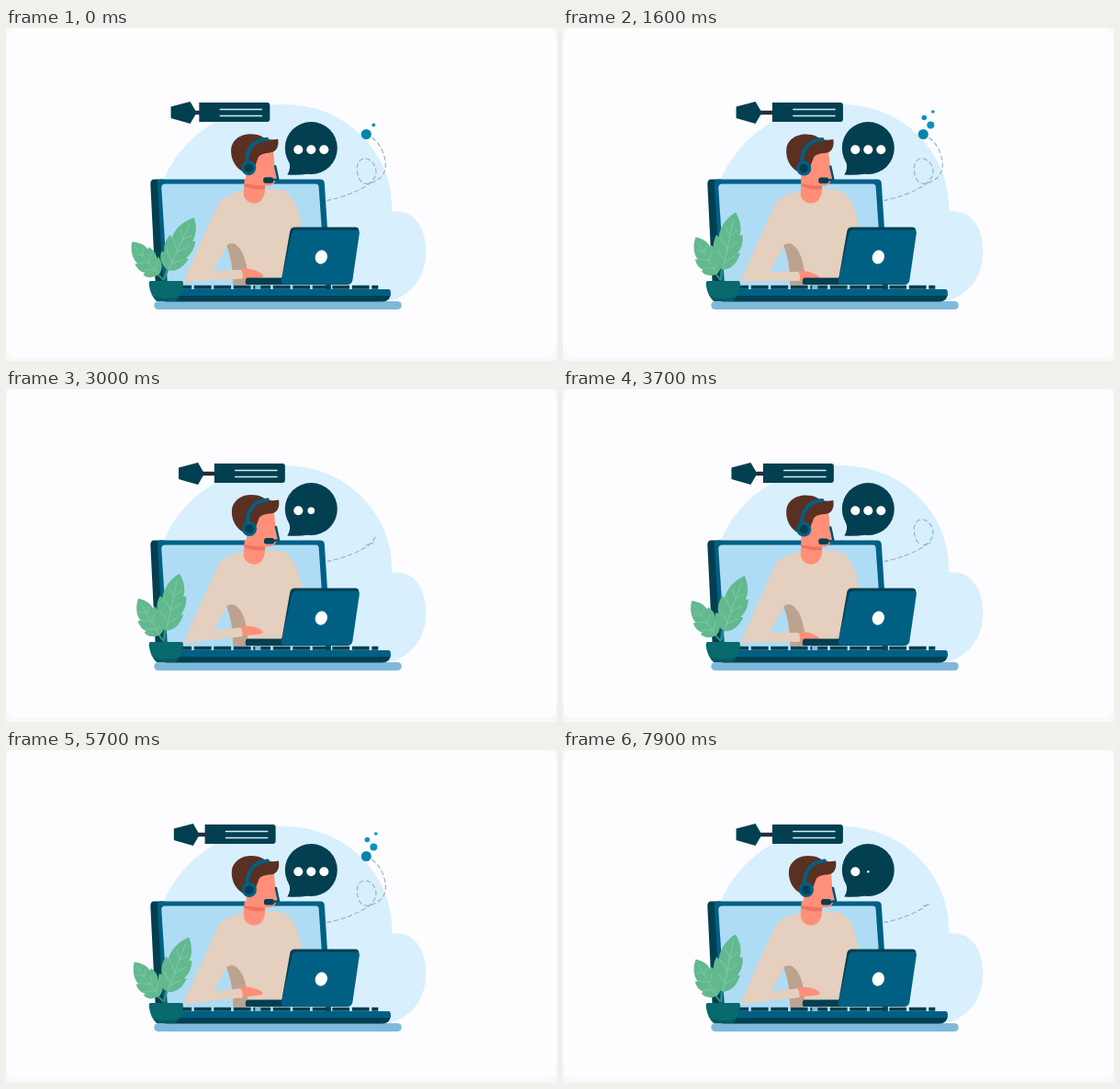
An HTML page that plays this animation: 600x362 px, repeating every 8 s.

```html
<!DOCTYPE html>
<html lang="en">
<head>
<meta charset="utf-8">
<title>Support agent</title>
<style>
html, body { margin: 0; width: 100%; height: 100%; overflow: hidden; background: #f8f8f9; }
svg { display: block; width: 600px; height: 362px; }
.dark { fill: #023f50; }
.blue { fill: #006084; }
.skin { fill: #ff8f78; }
.shirt { fill: #e5cfbe; }
.line { fill: none; stroke-linecap: round; stroke-linejoin: round; }
</style>
</head>
<body>
<svg viewBox="0 0 600 362">
  <defs>
    <g id="leaf">
      <path class="line" d="M0 0Q-2 -12 0 -24" stroke="#2f8f78" stroke-width="2.5"/>
      <path fill="#62b98f" d="M0 -10C-9 -12 -15 -18 -15 -26L-12 -26C-16 -33 -16 -39 -14 -46L-11 -44C-12 -53 -8 -65 2 -74C9 -66 12 -58 11 -50L14 -51C16 -44 16 -37 12 -30L15 -31C14 -20 9 -12 0 -10Z"/>
      <path class="line" d="M0 -12L1 -66M0 -20L-10 -29M0 -34L-10 -44M0 -49L-6 -56M0 -18L10 -27M0 -32L10 -42M0 -47L8 -55" stroke="#86cba8" stroke-width=".8"/>
    </g>
    <mask id="trim"><path id="reveal" class="line" pathLength="1" stroke="#fff" stroke-width="4" stroke-dasharray="0 2" style="stroke-linecap:butt"/></mask>
  </defs>
  <rect width="600" height="358" rx="12" fill="#fdfcff"/>
  <g transform="translate(.3 .5)">
  <path fill="#d8effd" d="M166 180C180 128 230 82.500 303 82.500C370 83 422 135 420 199C445 196 457 218 457 242C457 272 440 290 418 296H170Z"/>

  <!-- screwdriver -->
  <rect id="shaft" y="89.300" height="4.400" fill="#2a2a38"/>
  <path id="blade" class="dark" d="M0 85L21 79.500L28 91.500L21 103.500L0 97.500Z"/>
  <g id="handle">
    <path class="dark" d="M0 80.500H74Q77 80.500 77 83.500V98.500Q77 101.500 74 101.500H0Z"/>
    <path class="line" d="M23 88H68M23 95H68" stroke="#d5ebf2" stroke-width="1.700"/>
  </g>

  <!-- dashed trail and its dots -->
  <path id="trail" class="line" mask="url(#trim)" stroke="#8fb0c0" stroke-width="1.100" stroke-dasharray="4.500 3.500" d="M349 187C368 183.500 386 176 396 168C404 161 405 152 398 145C391 138 382 142 382 152C382 163 387 170 394 168.500C403 167 413 161 413 149C413 134 404 120 392 115"/>
  <g id="dots"></g>

  <!-- large laptop -->
  <path class="dark" d="M161 164H172L178 284H165Q163 284 162.500 280L157 169Q157 164 161 164Z"/>
  <path class="blue" d="M168 164H342Q346 164 346.500 168L354 284H171.500L164.500 169Q164 164 168 164Z"/>
  <path fill="#aedcf5" d="M173 169H337Q340 169 340.300 172L348 284H176L169 173Q169 169 173 169Z"/>
  <rect x="161" y="296.500" width="269.500" height="9" rx="4.500" fill="#7fb9da"/>
  <path class="dark" d="M165 287H418.500Q419 297 409 297H175Q165 297 165 287Z"/>
  <path class="blue" d="M165 283.500H416.500Q418.500 283.500 418.500 286V290.500H165Z"/>

  <!-- person -->
  <path class="shirt" d="M259 176C246 179 234 183 229 194C220 216 207 242 193 275L221 270L242 234L247 279H301L322 217C319 198 313 181 301 176Q292 174 282 174.500Z"/>
  <path fill="#bca390" d="M240 236Q242 233 248 234C256 238 260 248 263 265L262 279H247Q247 254 240 236Z"/>
  <path d="M183 281.300H405" stroke="#023f50" stroke-width="4" stroke-dasharray="18.800 2.700"/>
  <g id="arm">
    <path class="skin" d="M254 265Q263 262.500 269 265Q278 268 280 272Q279 274 275 274H254Z"/>
    <path class="shirt" d="M193 275.500L205 258L222 264.500L256 264.500Q259 269 257 274.500Q226 274 193 275.500Z"/>
  </g>
  <path class="skin" d="M259.500 163L258.500 178C258 186 264 190 270 190C276 190 280 186 281.500 178V168Z"/>
  <path fill="#ef735e" d="M259 169L282 171L281.500 174.500Q270 176 259 171.500Z"/>
  <g id="head">
    <path class="skin" d="M264 134H289L290.500 152L292 162Q291 170.500 285 171Q270 172 259 168V145Z"/>
    <path fill="#5a3022" d="M258 157C246 152 241 139 243.500 128C248 115 264 112.500 276 117.500C282 122 288 121.500 294 120.500C295.500 129 292 135.500 284 135.500C277 136 273 138 272 142L269 150Z"/>
    <path class="line" d="M260 146C259 132 268 121 282 120.500" stroke="#006084" stroke-width="4"/>
    <circle class="blue" cx="262" cy="152" r="8"/>
    <circle class="dark" cx="262" cy="152" r="4.800"/>
    <path class="line" d="M291 150L294 164L287 165.500" stroke="#00526f" stroke-width="2.500"/>
    <rect class="dark" x="278" y="162" width="11" height="6.500" rx="2.500"/>
  </g>

  <!-- small laptop -->
  <path class="dark" d="M263 271H300L309 220Q310 216 314 216H380Q384 216 384 220L376 275Q375 278.500 371 278.500H263Q260 278.500 260.500 275Q260.500 271 263 271Z"/>
  <path class="blue" d="M316 219H381Q385 219 384.500 223L377 274Q376 278 372 278H303Q299 278 299.500 274L311 223Q312 219 316 219Z"/>
  <ellipse cx="343" cy="248.500" rx="6.500" ry="7.600" transform="rotate(18 343 248.500)" fill="#fff"/>
  <rect x="271" y="279" width="6" height="4.500" fill="#7fb9da"/>

  <!-- plant -->
  <use id="small" href="#leaf"/>
  <use id="big" href="#leaf"/>
  <path fill="#086a6c" d="M157 274.500H191Q193 274.500 192.500 279Q191 291 184 296.500H164Q157 291 155.500 279Q155 274.500 157 274.500Z"/>
  <path fill="#06585f" d="M160 291Q174 296 188 291Q186.500 294.500 184 296.500H164Q161.500 294.500 160 291Z"/>

  <g id="bubble">
    <circle class="dark" cx="332" cy="130" r="28.500"/>
    <path class="dark" d="M307 143Q311 151 306 159Q318 160 329 158Z"/>
    <g id="typing" fill="#fff"></g>
  </g>
  </g>
</svg>
<script>
const $ = id => document.getElementById(id);
const clamp = x => Math.min(1, Math.max(0, x));
const ramp = (p, start, length) => clamp((p - start) / length);
const ease = x => (1 - Math.cos(Math.PI * x)) / 2;
const pulse = (q, length) => ease(ramp(q, 0, length)) - ease(ramp(q, 900, length));
const move = (id, value) => $(id).setAttribute("transform", value);

function addCircle(parent, cx, cy, fill) {
  const c = document.createElementNS("http://www.w3.org/2000/svg", "circle");
  c.setAttribute("cx", cx);
  c.setAttribute("cy", cy);
  if (fill) c.setAttribute("fill", fill);
  $(parent).append(c);
  return c;
}

const dots = [[392, 115, 5.5], [400, 105, 4], [393, 97, 2.8], [402.5, 90.5, 1.8]]
  .map(([x, y, r], i) => ({ r, el: addCircle("dots", x, y, i ? "#0a93bd" : "#0084ab") }));
const typing = [318, 332, 346].map(x => addCircle("typing", x, 131.7));
$("reveal").setAttribute("d", $("trail").getAttribute("d"));

function draw(t) {
  const p = (t + 2750) % 5000;

  // slow sway: 1 at the start of each cycle, 0 halfway
  const sway = (1 + Math.cos(p / 2500 * Math.PI)) / 2;
  const blade = 179 + 11 * sway, handle = 209.5 + 21.5 * sway;
  move("blade", `translate(${blade} 0)`);
  move("handle", `translate(${handle} 0)`);
  $("shaft").setAttribute("x", blade + 26);
  $("shaft").setAttribute("width", handle - blade - 25);
  move("big", `translate(172 272) rotate(${25 - 17 * sway})`);
  move("small", `translate(171 273) rotate(${-42 + 12 * sway}) scale(.84 .72)`);

  // nod and typing hand, twice per cycle
  const q = p % 2500;
  const nod = pulse(q, 400);
  move("head", `translate(${2.7 * nod} ${-0.5 * nod})`);
  move("arm", `rotate(${-6 * pulse(q, 600)} 200 272)`);

  const grow = ramp(p, 0, 400);
  move("bubble", `translate(305 158) scale(${grow}) translate(-305 -158)`);
  typing.forEach((c, i) => c.setAttribute("r", 5 * ramp(p, 400 + 200 * i, 200)));

  $("reveal").setAttribute("stroke-dasharray", `${ramp(p, 0, 2400)} 2`);
  dots.forEach(({ r, el }, i) => el.setAttribute("r", r * ramp(p, 2450 + 180 * i, 250)));
}

const start = performance.now();
function frame() {
  draw((performance.now() - start) % 8000);
  requestAnimationFrame(frame);
}
draw(0);
frame();
</script>
</body>
</html>
```
